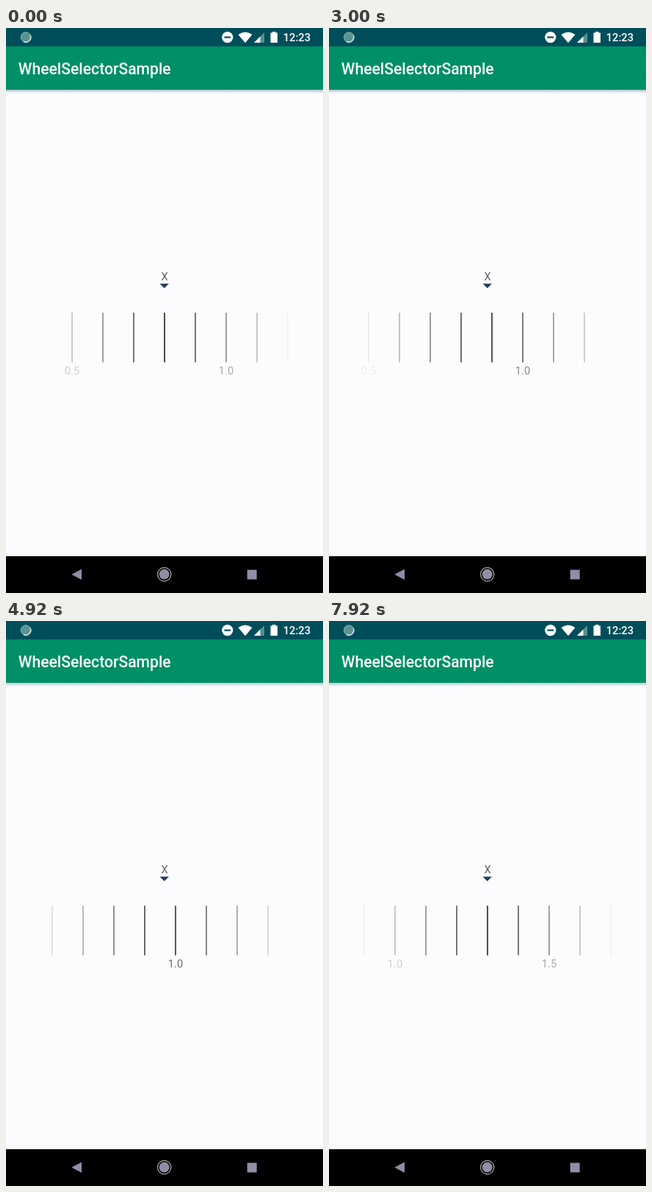
Recreate the animation shown at these times as an HTML page. Size 432 by 768 pixels, loop 8000 ms.

```html
<!DOCTYPE html>
<html lang="en">
<head>
<meta charset="utf-8">
<title>Wheel selector</title>
<style>
  html, body { margin: 0; width: 100%; height: 100%; overflow: hidden; background: #fcfcff; }
  svg { display: block; width: 100%; height: 100%; }
  text { font-family: Roboto, sans-serif; font-size: 14.7px; }
  .bar { font-weight: 500; fill: #fff; }
  .label { text-anchor: middle; fill: #626266; }
</style>
</head>
<body>
<svg viewBox="0 0 432 768">
  <defs>
    <linearGradient id="shadow" x2="0" y2="1">
      <stop stop-color="#b4c4d4"/>
      <stop offset="1" stop-color="#fcfcff"/>
    </linearGradient>
  </defs>
  <rect width="432" height="768" fill="#fcfcff"/>
  <rect y="84" width="432" height="5" fill="url(#shadow)"/>
  <rect y="25" width="432" height="59" fill="#008f66"/>
  <rect width="432" height="25" fill="#004e5a"/>
  <text class="bar" x="16.8" y="63" style="font-size:21.15px">WheelSelectorSample</text>

  <!-- status icons -->
  <circle cx="27" cy="12.5" r="6.7" fill="#5b9292" stroke="#8fb6b4"/>
  <path d="M33 9.5A6.7 6.7 0 0 1 24 18.5" fill="none" stroke="#d5e5e5" stroke-width="1.5"/>
  <circle cx="301.8" cy="12.6" r="7.6" fill="#fff"/>
  <rect x="297.5" y="11.5" width="8.6" height="2.2" fill="#004e5a"/>
  <path d="M316.5 9Q326 2 335.5 9L326 20.3Z" fill="#fff"/>
  <path d="M338 20L352 6V20Z" fill="#55908a"/>
  <path d="M338 20L346.5 11.5V20Z" fill="#fff"/>
  <path d="M360.5 6.5H363V5H367.5V6.5H370V20H360.5Z" fill="#fff"/>
  <text class="bar" x="377.7" y="18.2">12:23</text>

  <text class="label" x="216" y="343">X</text>
  <path d="M209.5 347.5H222L215.8 353.7Z" fill="#273c5c"/>
  <g id="wheel"></g>

  <!-- navigation bar -->
  <rect y="718" width="432" height="50" fill="#000"/>
  <g fill="#918ca8">
    <path d="M89.3 742.7L103 735.5V750Z"/>
    <circle cx="215.7" cy="742.6" r="7"/>
    <circle cx="215.7" cy="742.6" r="9.2" fill="none" stroke="#aaa698" stroke-width="1.3"/>
    <rect x="328.7" y="736.5" width="13" height="13"/>
  </g>
</svg>
<script>
const LOOP = 8000, CENTER = 216, SPACING = 42, FADE = 177;
const FIRST = 5, LAST = 25; // tenths

// [time in ms, selected value in tenths]
const steps = [
  [0, 8], [2590, 8], [3710, 10.81], [4250, 11], [4630, 11],
  [4920, 9.64], [5460, 10], [6210, 10], [6630, 13.4],
  [6780, 13.4], [6920, 13], [LOOP, 13]
];

const wheel = document.getElementById('wheel');

function add(parent, tag, attrs = {}) {
  const node = document.createElementNS('http://www.w3.org/2000/svg', tag);
  for (const name in attrs) node.setAttribute(name, attrs[name]);
  return parent.appendChild(node);
}

const ticks = [];
for (let value = FIRST; value <= LAST; value++) {
  const node = add(wheel, 'g');
  add(node, 'rect', { x: -0.7, y: 387, width: 1.5, height: 67.5, fill: '#14140e' });
  if (value % 5 === 0) {
    add(node, 'text', { class: 'label', y: 470.5 }).textContent = (value / 10).toFixed(1);
  }
  ticks.push({ value, node });
}

function valueAt(time) {
  const next = steps.findIndex(step => step[0] > time);
  const [t0, v0] = steps[next - 1], [t1, v1] = steps[next];
  const p = (time - t0) / (t1 - t0);
  return v0 + (v1 - v0) * p * p * (3 - 2 * p);
}

function draw(time) {
  const selected = valueAt(time);
  for (const { value, node } of ticks) {
    const offset = (value - selected) * SPACING;
    node.setAttribute('transform', `translate(${CENTER + Math.round(offset)} 0)`);
    node.setAttribute('opacity', Math.max(0, 1 - Math.abs(offset) / FADE));
  }
}

const start = performance.now();
function frame() {
  draw((performance.now() - start) % LOOP);
  requestAnimationFrame(frame);
}
frame();
</script>
</body>
</html>
```
